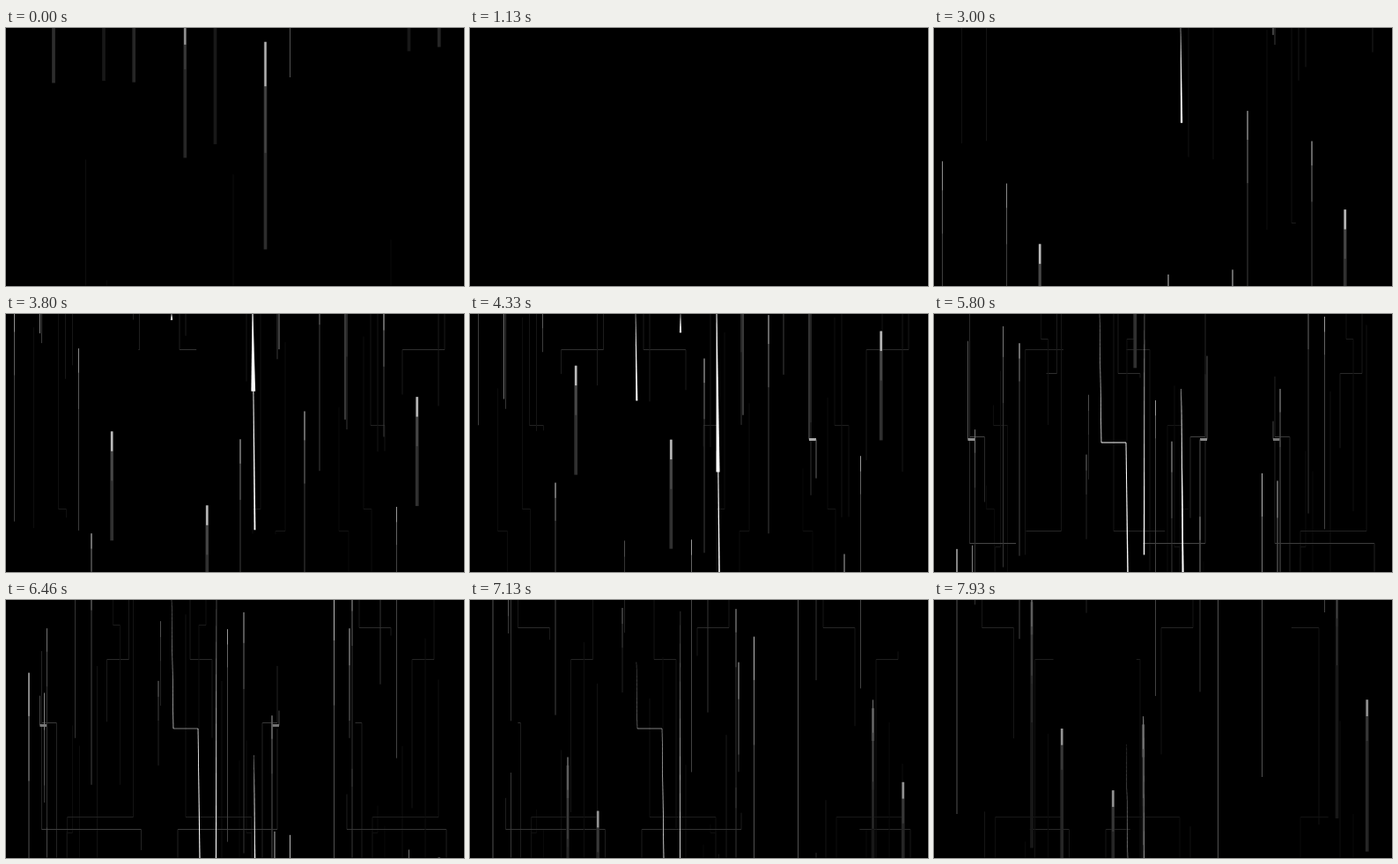
These frames come from a looping animation (520 by 293 pixels, 8000 ms). An HTML page with a canvas:

```html
<!DOCTYPE html>
<html lang="en">
<head>
<meta charset="utf-8">
<title>Light traces</title>
<style>
  html, body { margin: 0; width: 100%; height: 100%; overflow: hidden; background: #000; }
  canvas { display: block; width: 100vw; height: 100vh; }
</style>
</head>
<body>
<canvas id="stage" width="520" height="293"></canvas>
<script>
const W = 520, H = 293, LOOP = 8000, STEPS = 120;
const ctx = document.getElementById('stage').getContext('2d');
const gray = g => { g = Math.min(255, Math.round(g)); return `rgb(${g},${g},${g})`; };

// The same circuit appears three times: plain, mirrored and shifted, each with its own lead.
const copies = [
  { x: 0, flip: 1, rise: 0, fall: 0 },
  { x: 348.5, flip: -1, rise: -600, fall: 130 },
  { x: 346.5, flip: 1, rise: 280, fall: 700 }
];

// Rising bars: the head enters at start, the tail at leave. The glowing cap grows with speed.
const risers = [];
const rise = (w, cap) => (x, shade, start, speed, leave, leaveSpeed = speed) =>
  risers.push({ x, w, cap, shade, start, speed, leave, leaveSpeed });
const line = rise(1, 2.3), beam = rise(3.7, 4);

line(9.5, 62, 2310, .205, 3520);
line(82.5, 60, 2324, .172, 3676, .38);
line(97, 66, 3395, .108, 5630);
line(78.5, 52, 4520, .218, 5775);
line(175.5, 34, 4020, .113, 4870);
line(46.5, 50, 4820, .165, 6190);
line(43.5, 55, 5685, .262, 6160);
line(26, 80, 5715, .307, 7600, .15);
beam(120.2, 48, 2660, .14, 3545);
beam(111, 24, 6680, .232, 7838, .12);
line(111, 50, 6640, .232, 7270);
beam(145.2, 38, 6677, .117, 8162, .143);
beam(54, 45, 8300, .315, 9048);

// Traces fall along a path at a shared pace and fade over their life.
const trace = (pts, start, leave, tipSpeed, tailSpeed) => {
  let len = 0;
  for (let i = 2; i < pts.length; i += 2) len += Math.hypot(pts[i] - pts[i - 2], pts[i + 1] - pts[i - 1]);
  return { pts, len, start, leave, tipSpeed, tailSpeed, end: leave + len / tailSpeed };
};

// A route drops at x, crosses over at y, and drops on at x2.
const routes = [];
const route = (x, y, x2, tone, start, leave, thick = 1) => routes.push({
  tone, thick, ...trace([x, 0, x, y, x2, y, x2, H], start, leave, .14, .13)
});

route(32, 247, 43, 20, 2060, 3680);
route(60, 222, 69, 22, 2080, 4300);
route(68, 127, 84, 25, 3270, 5000);
route(76, 265, 70, 25, 3380, 5300);
route(152, 41, 104, 32, 3500, 5450);
route(145, 247, 70, 30, 3750, 6400);
route(41, 140, 58, 56, 4150, 5950);
route(41, 261, 154, 60, 3560, 5400);
route(140, 68, 115, 30, 5230, 7380);
route(122, 29, 130, 22, 4840, 6700);
route(55, 32, 91, 28, 6550, 8350);
route(39, 143, 47, 130, 3640, 5560, 3);

// White accents widen towards the tip.
const accent = (w, start, leave, ...pts) => ({ w, ...trace(pts, start, leave, .172, .152) });
const accents = [
  accent(2.6, 2374, 5240, 280, 0, 283, H),
  accent(5.5, 3290, 5240, 280, 0, 282.5, H),
  accent(2.2, 4210, 7050, 239, 0, 238.5, H),
  accent(2.4, 3760, 6670, 188, 0, 190, 146, 218, 146, 220, H)
];

const travel = (start, speed, t) => Math.max(0, (t - start) * speed);
const strength = (p, t) => Math.max(0, Math.min(1, (p.end - t) / (p.end - p.start)));

function bar(x, w, top, bottom, tone) {
  top = Math.max(0, top);
  if (bottom <= top) return;
  ctx.fillStyle = gray(tone);
  ctx.fillRect(x - w / 2, top, w, bottom - top);
}

function drawRiser(r, t) {
  const head = H - travel(r.start, r.speed, t), tail = H - travel(r.leave, r.leaveSpeed, t);
  const part = (len, w, gain) => bar(r.x, w, head, Math.min(tail, head + len), r.shade * gain);
  const core = Math.max(1, r.w * .6);
  part(H * 4, r.w, 1);
  part(400 * r.speed, core, 1.5);
  part(160 * r.speed, core, r.cap);
}

// Calls draw(x1, y1, x2, y2, d1, d2) for each piece of a path between two distances.
function pieces(pts, from, to, draw) {
  let done = 0;
  for (let i = 0; i + 3 < pts.length; i += 2) {
    const [x, y, x2, y2] = pts.slice(i, i + 4);
    const len = Math.hypot(x2 - x, y2 - y);
    const a = Math.max(0, from - done), b = Math.min(len, to - done);
    if (b > a) {
      const dx = (x2 - x) / len, dy = (y2 - y) / len;
      draw(x + dx * a, y + dy * a, x + dx * b, y + dy * b, done + a, done + b);
    }
    done += len;
  }
}

const span = (p, t) => [travel(p.leave, p.tailSpeed, t), travel(p.start, p.tipSpeed, t)];

function drawRoute(r, t) {
  const tone = r.tone * (.3 + .7 * strength(r, t));
  pieces(r.pts, ...span(r, t), (x1, y1, x2, y2) => {
    const flat = y1 === y2;
    ctx.strokeStyle = gray(tone * (flat ? 1.7 : 1));
    ctx.lineWidth = flat ? r.thick : 1;
    ctx.beginPath();
    ctx.moveTo(x1 - .5, y1 - .5);
    ctx.lineTo(x2 - .5, y2 - .5);
    ctx.stroke();
  });
}

function drawAccent(a, t) {
  const [from, to] = span(a, t), end = Math.min(to, a.len);
  const w = a.w * strength(a, t);
  const width = d => w * (.2 + .8 * (d - from) / Math.max(1, end - from));
  ctx.fillStyle = '#fff';
  pieces(a.pts, from, end, (x1, y1, x2, y2, d1, d2) => {
    const len = Math.hypot(x2 - x1, y2 - y1);
    const nx = (y2 - y1) / len / 2, ny = (x1 - x2) / len / 2;
    const w1 = width(d1), w2 = width(d2);
    ctx.beginPath();
    ctx.moveTo(x1 + nx * w1, y1 + ny * w1);
    ctx.lineTo(x2 + nx * w2, y2 + ny * w2);
    ctx.lineTo(x2 - nx * w2, y2 - ny * w2);
    ctx.lineTo(x1 - nx * w1, y1 - ny * w1);
    ctx.fill();
  });
}

function draw(ms) {
  const step = LOOP / STEPS;
  let t = Math.floor((ms % LOOP + 4) / step) % STEPS * step;
  if (t < 1200) t += 9780; // the loop opens on the end of the sequence
  ctx.setTransform(1, 0, 0, 1, 0, 0);
  ctx.fillStyle = '#000';
  ctx.fillRect(0, 0, W, H);
  for (const c of copies) {
    ctx.setTransform(c.flip, 0, 0, 1, c.x, 0);
    for (const r of routes) drawRoute(r, t + c.fall);
    for (const r of risers) drawRiser(r, t + c.rise);
  }
  ctx.setTransform(1, 0, 0, 1, 0, 0);
  for (const a of accents) drawAccent(a, t);
}

function tick() {
  draw(performance.now());
  requestAnimationFrame(tick);
}
tick();
</script>
</body>
</html>
```
